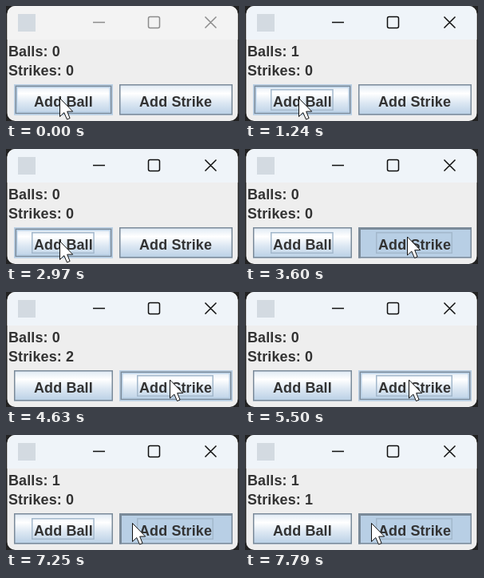
Animation of 292 by 144 pixels, one loop 7.99 s. Source, as an HTML page with a canvas:

```html
<!DOCTYPE html>
<html lang="en">
<head>
<meta charset="utf-8">
<title>Balls and strikes</title>
<style>
html, body { margin: 0; width: 100%; height: 100%; overflow: hidden; background: #222; }
canvas { display: block; width: 292px; height: 144px; }
</style>
</head>
<body>
<canvas id="stage" width="292" height="144"></canvas>
<script>
const ctx = document.getElementById('stage').getContext('2d');
const LOOP = 7990;
const LINE = 1.5; // one interface unit at 150 % scaling
const SHADOW = '#7a8a99', BLUE = '#b8cfe5', PALE = '#dde8f3', FOCUS = '#a3b8cc';
const RESET_HOLD = 410;

const BALL = { x: 10, w: 124, label: 'Add Ball', limit: 4, hold: 130 };
const STRIKE = { x: 142, w: 142, label: 'Add Strike', limit: 3, hold: 270 };

const series = (button, first, gap, count) =>
  Array.from({ length: count }, (_, i) => ({ button, down: first + i * gap }));

const clicks = [
  ...series(BALL, 70, 0, 1),
  ...series(BALL, 1370, 330, 3),
  ...series(STRIKE, 3600, 710, 3),
  ...series(BALL, 6300, 0, 1),
  ...series(STRIKE, 7120, 670, 2)
];

const home = { x: 67, y: 115 };
const moves = [
  { from: 2990, to: 3530, x: 203, y: 109.5 },
  { from: 4500, to: 4630, x: 205, y: 109.5 },
  { from: 6190, to: 6290, x: 114, y: 112 },
  { from: 6420, to: 6490, x: 148, y: 110 },
  { from: 6510, to: 6980, x: 158, y: 110 }
];

const clamp = v => Math.max(0, Math.min(1, v));
const ease = v => v * v * (3 - 2 * v);
const mix = (a, b, k) => a + (b - a) * k;
const gray = v => `rgb(${v},${v},${v})`;

function pointerAt(t) {
  return moves.reduce((p, m) => {
    const k = ease(clamp((t - m.from) / (m.to - m.from)));
    return { x: mix(p.x, m.x, k), y: mix(p.y, m.y, k) };
  }, home);
}

// Replays the clicks: the fourth ball or third strike clears both counts.
function stateAt(t) {
  const state = { balls: 0, strikes: 0, down: null, focus: [] };
  for (const { button, down } of clicks) {
    if (down > t) break;
    const count = button === BALL ? 'balls' : 'strikes';
    const full = state[count] + 1 === button.limit;
    if (t < down + (full ? RESET_HOLD : button.hold)) {
      state.down = button;
      state.focus.push(button);
    } else {
      state.focus = [button];
      if (full) state.balls = state.strikes = 0;
      else state[count]++;
    }
  }
  return state;
}

function text(str, x, y) {
  ctx.fillStyle = '#333';
  ctx.fillText(str, x, y);
}

function frame(x, y, w, h, inset, color) {
  const d = (inset + 0.5) * LINE;
  ctx.strokeStyle = color;
  ctx.strokeRect(x + d, y + d, w - 2 * d, h - 2 * d);
}

function drawWindow(active) {
  ctx.fillStyle = '#222';
  ctx.fillRect(0, 0, 292, 144);
  ctx.save();
  ctx.beginPath();
  ctx.roundRect(1.5, 0, 289, 144, 10);
  ctx.clip();
  ctx.fillStyle = '#eee';
  ctx.fillRect(0, 0, 292, 144);
  ctx.fillStyle = `rgb(${mix(243, 239, active)},${mix(243, 244, active)},${mix(243, 249, active)})`;
  ctx.fillRect(0, 0, 292, 42);
  ctx.restore();

  ctx.fillStyle = '#d3dae1';
  ctx.fillRect(15, 10, 22, 22);

  ctx.strokeStyle = gray(mix(140, 15, active));
  ctx.beginPath();
  ctx.moveTo(109, 20.5);
  ctx.lineTo(124, 20.5);
  ctx.roundRect(178.5, 13.5, 14, 14, 2);
  ctx.moveTo(249.5, 13.5);
  ctx.lineTo(263.5, 27.5);
  ctx.moveTo(263.5, 13.5);
  ctx.lineTo(249.5, 27.5);
  ctx.stroke();
}

function drawButton(b, state, pointer) {
  const { x, w, label } = b;
  const y = 98, h = 38.5;
  const down = state.down === b;
  const hover = pointer.x >= x && pointer.x < x + w;

  const fill = ctx.createLinearGradient(0, y, 0, y + h);
  [PALE, '#fff', PALE].forEach((color, i) => fill.addColorStop(i * 0.3, color));
  fill.addColorStop(1, BLUE);
  ctx.fillStyle = down ? BLUE : fill;
  ctx.fillRect(x, y, w, h);

  if (hover && !down) {
    frame(x, y, w, h, 0, BLUE);
    frame(x, y, w, h, 1, SHADOW);
    frame(x, y, w, h, 2, BLUE);
  } else {
    frame(x, y, w, h, 0, SHADOW);
  }
  if (down) {
    ctx.fillStyle = SHADOW;
    ctx.fillRect(x, y, w, 2 * LINE);
    ctx.fillRect(x, y, 2 * LINE, h);
  }

  const width = ctx.measureText(label).width;
  const textX = Math.round(x + (w - width) / 2);
  text(label, textX, 126);
  if (state.focus.includes(b)) frame(textX - 3, 104, width + 5, 27, 0, FOCUS);
}

function drawPointer({ x, y }) {
  ctx.save();
  ctx.translate(x + 0.5, y + 0.5);
  ctx.beginPath();
  [[0, 0], [0, 23], [5.3, 18], [9, 26.5], [12.6, 25], [9.2, 16.6], [16.2, 16.6]]
    .forEach(([px, py]) => ctx.lineTo(px, py));
  ctx.closePath();
  ctx.fillStyle = '#fff';
  ctx.fill();
  ctx.strokeStyle = '#111';
  ctx.lineWidth = 1;
  ctx.stroke();
  ctx.restore();
}

function draw(t) {
  const pointer = pointerAt(t);
  const state = stateAt(t);
  ctx.font = 'bold 18px "Liberation Sans", Arial, sans-serif';
  ctx.letterSpacing = '0.1px';
  ctx.lineWidth = LINE;
  drawWindow(clamp((t - 50) / 200));
  text('Balls: ' + state.balls, 3, 63);
  text('Strikes: ' + state.strikes, 3, 87);
  drawButton(BALL, state, pointer);
  drawButton(STRIKE, state, pointer);
  drawPointer(pointer);
}

const start = performance.now();
function tick() {
  draw((performance.now() - start) % LOOP);
  requestAnimationFrame(tick);
}
tick();
</script>
</body>
</html>
```
